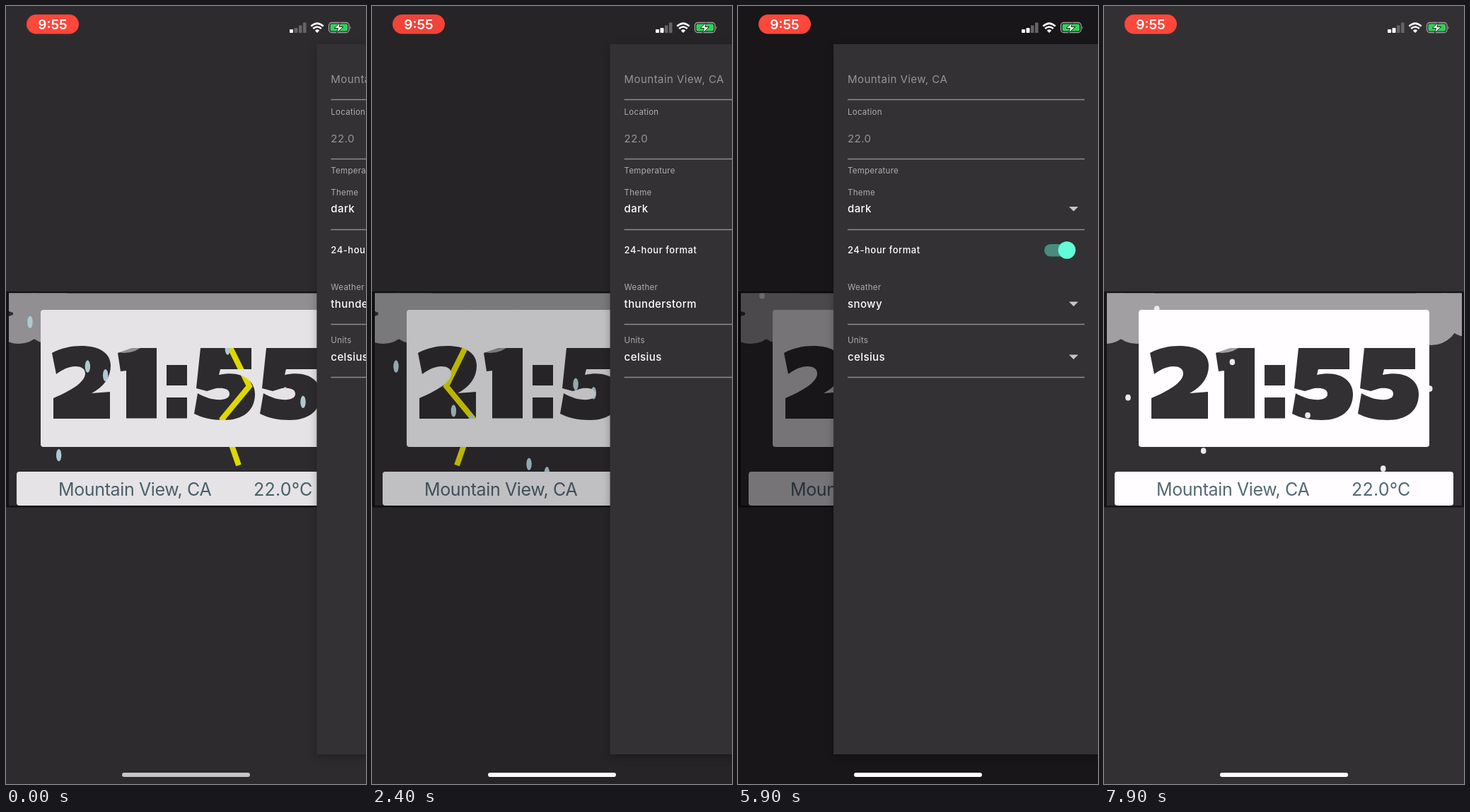
These frames come from a looping animation (509 px wide and 1101 px high, 8000 ms). An HTML page:

```html
<!DOCTYPE html>
<html lang="en">
<head>
<meta charset="utf-8">
<style>
  html, body { margin: 0; width: 100%; height: 100%; overflow: hidden; background: #333033; }
  svg { display: block; width: 509px; height: 1101px; font-family: Inter, Roboto, sans-serif; }
  .face { font-size: 25px; fill: #546a75; }
  .value { font-size: 15px; letter-spacing: .4px; font-weight: 500; fill: #fff; }
  .muted { font-size: 15px; letter-spacing: .45px; fill: #979597; }
  .label { font-size: 11.5px; letter-spacing: .25px; fill: #aeacae; }
  .switch { font-size: 13px; letter-spacing: .53px; font-weight: 500; fill: #fff; }
  #drawer { filter: drop-shadow(0 4px 6px #0004); }
  #menu { filter: drop-shadow(0 4px 6px #0007); }
</style>
</head>
<body>
<svg viewBox="0 0 509 1101">
  <defs>
    <clipPath id="window"><path d="M4 406.5H506V707H4Z"/></clipPath>
    <clipPath id="menuClip"><rect id="menuRect" x="125" width="390"/></clipPath>
    <mask id="digits" maskUnits="userSpaceOnUse" x="0" y="400" width="509" height="320">
      <rect x="49" y="430" width="411" height="194" rx="4" fill="#fff"/>
      <path d="M65 491C78 484 92 481 106 481C132 481 148 491 148 509C148 526 138 539 121 548L147 546V584H67V555C90 545 112 533 112 520C112 513 106 510 98 510C88 510 79 515 71 521Z"/>
      <path d="M158 491L178 484H213V583.5H170V516L162 517Z"/>
      <path d="M227 508H256V537H227ZM227 554H256V583.5H227Z"/>
      <path id="five" d="M275 484H347V514H303L301 522C332 515 352 529 352 549C352 573 335 586 308 586C291 586 278 583 266 577L271 548C283 555 295 558 305 557C313 556 316 553 316 549C316 541 306 540 297 541L284 545L269 541Z"/>
      <use href="#five" x="93"/>
    </mask>
  </defs>

  <rect width="509" height="1101" fill="#333033"/>
  <rect y="404" width="509" height="305.5" fill="#151315"/>
  <g clip-path="url(#window)">
    <rect y="404" width="509" height="306" fill="#323032"/>
    <g fill="#a19fa1">
      <rect y="404" width="509" height="30"/>
      <g id="leftCloud"><circle cx="10" cy="438" r="40"/><circle cx="54" cy="438" r="40"/></g>
      <circle cx="167" cy="450" r="41"/>
      <g id="rightCloud"><circle cx="466" cy="440" r="40"/><circle cx="518" cy="427" r="41"/></g>
    </g>
    <path id="notch" fill="#323032"/>
    <polyline id="bolt" fill="none" stroke="#f8f000" stroke-width="8"/>
    <g id="drops"></g>
    <rect x="49" y="430" width="411" height="194" fill="#fffdff" mask="url(#digits)"/>
    <rect x="15" y="659" width="479" height="48" rx="4" fill="#fffdff"/>
    <text class="face" x="74" y="692.5" letter-spacing="-.37">Mountain View, CA</text>
    <text class="face" x="350" y="692.5" letter-spacing=".2">22.0°C</text>
  </g>

  <rect id="scrim" width="509" height="1101" fill="#030005"/>
  <g id="drawer">
    <rect x="135" y="54" width="374" height="1005" fill="#333133"/>
    <path d="M155 132.5H490M155 216.5H490M155 316.5H490M155 450.5H490M155 525.5H490" stroke="#8d8b8d" stroke-width="1.3"/>
    <text class="muted" x="155" y="109">Mountain View, CA</text>
    <text class="label" x="155" y="153.5">Location</text>
    <text class="muted" x="155" y="193">22.0</text>
    <text class="label" x="155" y="237">Temperature</text>
    <text class="label" x="155" y="268">Theme</text>
    <text class="value" x="155" y="292">dark</text>
    <text class="switch" x="155" y="350">24-hour format</text>
    <text class="label" x="155" y="402">Weather</text>
    <text class="value" x="155" y="427" id="weather"></text>
    <text class="label" x="155" y="476.5">Units</text>
    <text class="value" x="155" y="502">celsius</text>
    <path d="M468 284H481L474.5 290.5ZM468 418.5H481L474.5 425ZM468 493.5H481L474.5 500Z" fill="#c8c6c8"/>
    <rect x="433" y="337" width="43" height="17.5" rx="8.7" fill="#478c7d"/>
    <circle cx="465" cy="345.5" r="12.3" fill="#64fbd8"/>
  </g>
  <g id="menu">
    <g clip-path="url(#menuClip)">
      <rect x="125" y="86" width="390" height="433" rx="2" fill="#333133"/>
      <rect id="press" x="125" y="274" width="384" height="59" fill="#fff"/>
      <g id="items"></g>
    </g>
  </g>

  <rect id="pill" x="29" y="12" width="74" height="27.5" rx="13.7"/>
  <text x="66" y="33" text-anchor="middle" font-size="19" font-weight="600" fill="#fff">9:55</text>
  <g fill="#fff">
    <rect x="401" y="33" width="5" height="5" rx="1"/>
    <rect id="bar" x="407.5" y="31" width="5" height="7" rx="1"/>
    <path d="M414 27.5h4.5v10.5h-4.5ZM420 23.5h4.5v14.5h-4.5Z" fill="#666466"/>
    <path d="M436.800 34.7Q440 32 443.2 34.7L440 38Z"/>
    <path d="M431.3 28.7Q440 20.5 448.7 28.7M434.2 32Q440 27 445.8 32" fill="none" stroke="#fff" stroke-width="2.5"/>
  </g>
  <rect x="456.5" y="23.5" width="28.5" height="14" rx="4" fill="none" stroke="#a5a3a5" stroke-width="1.3"/>
  <path d="M486.5 28.5q2 2 0 4.5Z" fill="#a5a3a5"/>
  <rect x="458.5" y="25.5" width="24.5" height="10" rx="2" fill="#32d158"/>
  <path d="M472.5 23.5L464 31.5H469.5L467.5 38L477 29.5H471Z" fill="#fff" stroke="#262426"/>
  <rect id="home" x="164" y="1085" width="181" height="6" rx="3"/>
</svg>
<script>
const $ = id => document.getElementById(id);
const set = (id, attrs) => { for (const k in attrs) $(id).setAttribute(k, attrs[k]); };
const ramp = (t, from, to) => Math.min(1, Math.max(0, (t - from) / (to - from)));
const easeOut = u => 1 - (1 - u) ** 2;
const mix = (a, b, u) => a + (b - a) * u;

const LOOP = 8000, SWITCH = 5000, SLIDE = 380;
const DROPS = 13, FALL = 314;
const RAIN = { start: -300, speed: .157, rx: 3.7, ry: 8.7, fill: "#c1e0ea", swayStart: 0, swayPeriod: 2150 };
const SNOW = { start: 5760, speed: .072, rx: 3.8, ry: 4.3, fill: "#eceaec", swayStart: 5900, swayPeriod: 4200 };

$("items").innerHTML = ["cloudy", "foggy", "rainy", "snowy", "sunny", "thunderstorm", "windy"]
  .map((name, i) => `<text class="value" x="145" y="${132 + i * 59}">${name}</text>`).join("");

// Columns are spread by the golden ratio, each a little further along its fall
function drop(i, t, { start, speed, rx, ry, fill }) {
  const x = 34 + 452 * (i * .618 % 1);
  const fallen = speed * (t - start) + FALL * (i * .12 + 5);
  return `<ellipse cx="${x}" cy="${400 + fallen % FALL}" rx="${rx}" ry="${ry}" fill="${fill}"/>`;
}

// side is 1 for a bolt pointing right, -1 for its mirror image
function zigzag(x, side) {
  return `${x - 38 * side},461 ${x},538 ${x - 38 * side},584 ${x - 15 * side},650`;
}

function drawWeather(t) {
  const snowing = t >= SWITCH, sky = snowing ? SNOW : RAIN;
  const sway = 8 * Math.cos(2 * Math.PI * (t - sky.swayStart) / sky.swayPeriod);
  set("leftCloud", { transform: `translate(${sway})` });
  set("rightCloud", { transform: `translate(${sway * .4})` });
  const tip = Math.max(4, 10 + (sway - 8) * .6);
  set("notch", { d: `M4 432L${tip} 434V437L4 439Z` });
  $("drops").innerHTML = Array.from({ length: DROPS }, (_, i) => drop(i, t, sky)).join("");
  set("bolt", { points: t < 300 ? zigzag(344, 1) : t > 2200 && t < 2550 ? zigzag(105, -1) : "" });
  $("weather").textContent = snowing ? "snowy" : "thunderstorm";
}

function drawPanels(t) {
  const slide = start => easeOut(ramp(t, start, start + SLIDE));
  const open = t < 1000 ? 1 - slide(-215) : slide(2300) - slide(5920);
  set("scrim", { opacity: .54 * open });
  set("drawer", { transform: `translate(${374 * (1 - open)})`, display: open > 0 ? "inline" : "none" });

  const grow = easeOut(ramp(t, 3530, 3750));
  const fade = ramp(t, 3450, 3550) * (1 - ramp(t, SWITCH, 5250));
  const top = mix(392, 86, grow);
  set("menu", { opacity: fade, display: fade > 0 ? "inline" : "none" });
  set("menuRect", { y: top, height: mix(451, 519, grow) - top });
  set("press", { opacity: .08 * ramp(t, 4750, 4900) });
}

function drawStatus(t) {
  const glow = .5 + .5 * Math.cos(Math.PI * t / 1000);
  set("pill", { fill: `rgb(${mix(214, 255, glow)},${mix(60, 71, glow)},${mix(52, 58, glow)})` });
  set("bar", { fill: t < 1900 ? "#666466" : "#fff" });
  const light = mix(198, 255, ramp(t, 0, 400));
  set("home", { fill: `rgb(${light},${light},${light})` });
}

function frame() {
  const t = performance.now() % LOOP;
  drawWeather(t);
  drawPanels(t);
  drawStatus(t);
  requestAnimationFrame(frame);
}
frame();
</script>
</body>
</html>
```
